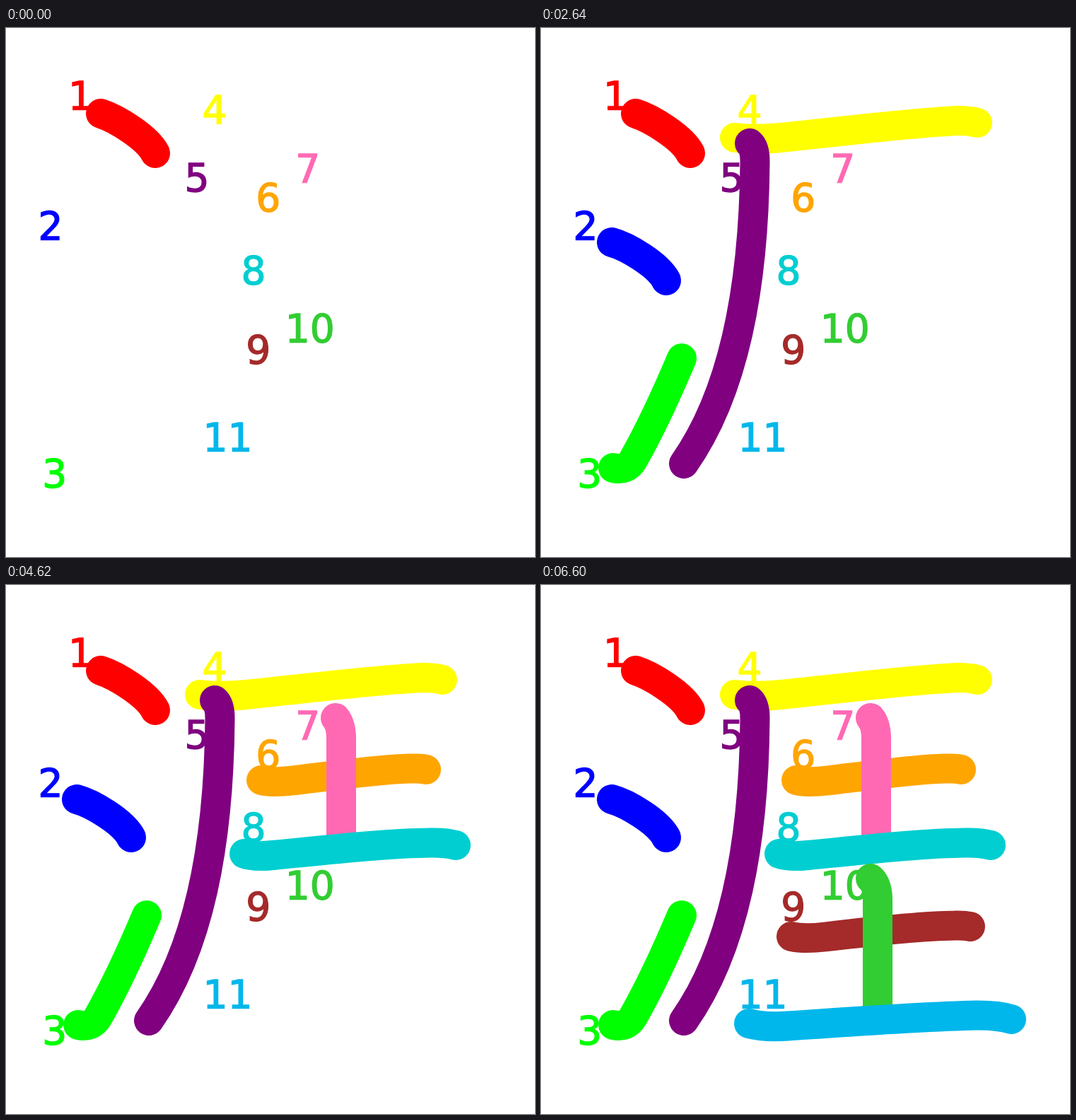
Animation of 748x748 px, one loop 7260 ms. Source, as an HTML page with a canvas:

```html
<!DOCTYPE html>
<html lang="en">
<head>
<meta charset="utf-8">
<title>Stroke order</title>
<style>
html, body { margin: 0; width: 100%; height: 100%; overflow: hidden; background: #fff; }
canvas { display: block; }
</style>
</head>
<body>
<canvas id="stage" width="748" height="748"></canvas>
<script>
const STEP = 660;
const ctx = document.getElementById('stage').getContext('2d');

// colour, label x, label baseline, centre line of the brush
const strokes = [
  ['#ff0000', 88, 114.5, 'M134 121C156 128 200 155 211 177'],
  ['#0000ff', 45.5, 299, 'M100 303C122 309 166 335 177 357'],
  ['#00ff00', 51.3, 648.5, 'M102 622Q121 626.5 130 611C158 562 180 512 199 467'],
  ['#ffff00', 277.5, 134.5, 'M274 155C300 158 320 157 340 155C430 146 520 134 590 131Q606 131 617 134'],
  ['#800080', 252.5, 230.5, 'M295 163Q303 170 302.5 190C301 367 273 515 202 616'],
  ['#ffa500', 353.3, 258.5, 'M361 276Q378 280 405 276.5C460 270 540 259 575 259.5Q587 259 594 261'],
  ['#ff69b4', 409.3, 217.5, 'M466 188Q474 198 474 217L474 365'],
  ['#00ced1', 332.5, 361.5, 'M337 380Q350 385 378 382C450 375 540 365 600 364.5Q622 364 636 368'],
  ['#a52a2a', 339.3, 473.5, 'M354 497Q372 501 402 497.5C465 490 540 482 585 481.5Q598 481 607 483'],
  ['#32cd32', 394.8, 443.5, 'M466 415Q476 424 476 445L476 605'],
  ['#00b7eb', 278.5, 598, 'M294 620Q315 626 350 623.5C430 618 540 610 615 608.5Q645 608 665 614']
].map(([color, x, y, d]) => ({ color, x, y, path: new Path2D(d) }));

function drawLabel(text, { color, x, y }) {
  ctx.fillStyle = ctx.strokeStyle = color;
  ctx.fillText(text, x, y);
  ctx.strokeText(text, x, y);
}

function draw(count) {
  ctx.fillStyle = '#fff';
  ctx.fillRect(0, 0, 748, 748);
  ctx.font = '55px "DejaVu Sans", sans-serif';
  ctx.lineJoin = 'miter';
  ctx.lineWidth = 1.4;
  strokes.forEach((s, i) => drawLabel(String(i + 1), s));
  ctx.lineWidth = 42;
  ctx.lineCap = ctx.lineJoin = 'round';
  strokes.slice(0, count).forEach(s => {
    ctx.strokeStyle = s.color;
    ctx.stroke(s.path);
  });
}

const start = performance.now();

function tick() {
  const t = Math.max(0, performance.now() - start) % (STEP * strokes.length);
  draw(Math.floor(t / STEP) + 1);
  requestAnimationFrame(tick);
}
tick();
</script>
</body>
</html>
```
